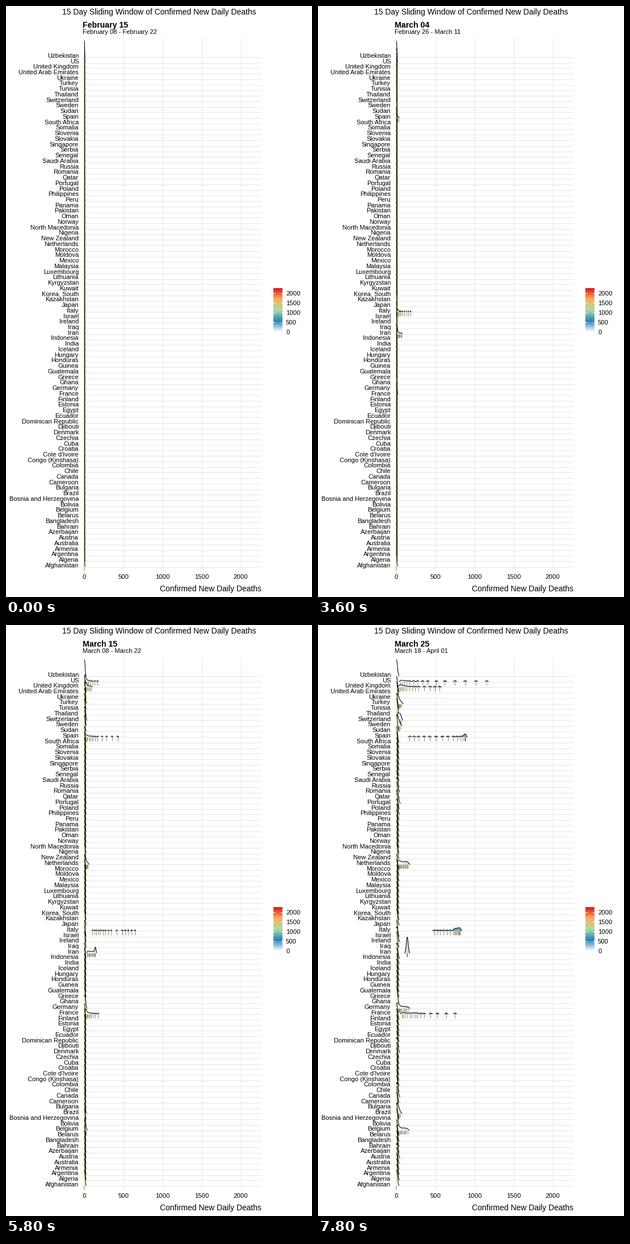
Recreate the animation shown at these times as a matplotlib script. Size 539x1039 px, loop 8000 ms.

```python
import matplotlib.pyplot as plt
import numpy as np
from matplotlib.animation import FuncAnimation
from matplotlib.collections import PathCollection
from matplotlib.colors import LinearSegmentedColormap, to_rgba
from matplotlib.path import Path

W, H, DPI = 539, 1039, 100
PX = 72 / DPI                      # points per pixel
FRAMES, STEP = 40, 200
X0, X_UNIT = 138.0, 275.6 / 2000   # pixel of value 0, pixels per death
TOP, BOTTOM = 90.0, 986.0          # baselines of the first and last row
LEFT, RIGHT = 135, 450
VMAX = 2265
PEAK = 29                          # pixel height of the tallest ridge
GRID = "#e5e5e5"

plt.rcParams["font.family"] = "Liberation Sans"

COUNTRIES = """Afghanistan|Algeria|Argentina|Armenia|Australia|Austria|Azerbaijan|Bahrain
Bangladesh|Belarus|Belgium|Bolivia|Bosnia and Herzegovina|Brazil|Bulgaria|Cameroon|Canada
Chile|Colombia|Congo (Kinshasa)|Cote d'Ivoire|Croatia|Cuba|Czechia|Denmark|Djibouti
Dominican Republic|Ecuador|Egypt|Estonia|Finland|France|Germany|Ghana|Greece|Guatemala
Guinea|Honduras|Hungary|Iceland|India|Indonesia|Iran|Iraq|Ireland|Israel|Italy|Japan
Kazakhstan|Korea, South|Kuwait|Kyrgyzstan|Lithuania|Luxembourg|Malaysia|Mexico|Moldova
Morocco|Netherlands|New Zealand|Nigeria|North Macedonia|Norway|Oman|Pakistan|Panama|Peru
Philippines|Poland|Portugal|Qatar|Romania|Russia|Saudi Arabia|Senegal|Serbia|Singapore
Slovakia|Slovenia|Somalia|South Africa|Spain|Sudan|Sweden|Switzerland|Thailand|Tunisia
Turkey|Ukraine|United Arab Emirates|United Kingdom|US|Uzbekistan""".replace("\n", "|").split("|")
COUNTRIES.reverse()                # top row first
ROWS = np.linspace(TOP, BOTTOM, len(COUNTRIES))

# Days count from March 1 as day 1. Smoothed deaths on every second day, 0 to 32.
LARGE = {
    "Italy": [10, 19, 29, 59, 103, 153, 206, 267, 341, 483, 560, 646, 729, 758, 801, 814, 763],
    "Iran": [9, 11, 15, 24, 37, 56, 76, 100, 122, 139, 141, 138, 139, 136, 138, 132, 134],
    "Spain": [.1, .5, 1.5, 4, 7, 18, 39, 71, 111, 169, 281, 425, 586, 729, 820, 882, 872],
    "France": [.2, .5, 1, 3, 5, 9, 18, 25, 42, 69, 111, 172, 225, 270, 352, 522, 750],
    "US": [.6, 2, 3, 3.5, 4, 5, 8, 15, 28, 53, 98, 167, 270, 399, 620, 878, 1154],
    "United Kingdom": [.1, .2, .3, .6, 1, 2, 5, 11, 20, 30, 56, 87, 130, 200, 283, 430, 551],
}
# Values on these days for middling counts.
MID_DAYS = [10, 14, 18, 22, 25, 28, 32]
MID = {
    "Netherlands": [1, 8, 18, 45, 75, 110, 150],
    "Germany": [.5, 2, 6, 20, 43, 85, 150],
    "Belgium": [.3, 2, 8, 25, 50, 88, 142],
    "Switzerland": [.8, 3, 7, 16, 29, 45, 58],
}
# Final values of small counts that grow exponentially.
SMALL = {
    "Turkey": 65, "Brazil": 48, "Sweden": 48, "Portugal": 27, "Canada": 20, "Austria": 19,
    "Romania": 18, "Denmark": 16, "Ireland": 16, "Indonesia": 14, "Philippines": 12,
    "Algeria": 10, "Ecuador": 10, "Poland": 8, "India": 8, "Dominican Republic": 6,
}

FIRST_DAY = -21
DAYS = np.arange(FIRST_DAY, 33)


def series(name, rng):
    """Smoothed daily deaths of one country for all days."""
    minor = rng.lognormal(0.5, 0.7)
    if name in LARGE:
        known = LARGE[name]
        v = np.interp(DAYS, np.arange(0, 33, 2), known)
        return np.where(DAYS < 0, known[0] * 2.0 ** (DAYS / 2), v)
    if name in MID:
        v = np.exp(np.interp(DAYS, MID_DAYS, np.log(MID[name])))
        return np.where(DAYS < 10, MID[name][0] * 2.0 ** ((DAYS - 10) / 3), v)
    return SMALL.get(name, minor) * 2.0 ** ((DAYS - 32) / 3.6)


rng = np.random.default_rng(15)
DEATHS = np.array([series(c, rng) for c in COUNTRIES])

CMAP = LinearSegmentedColormap.from_list(
    "deaths", ["white", "#2b83ba", "#abdda4", "#fdae61", "#d7191c"])
CLEAR = (0, 0, 0, 0)
BLACK = to_rgba("black")
YELLOW = to_rgba("#f4f03c")
GREEN = to_rgba("#74c23a")
TICK_COLORS = [to_rgba(c) for c in ("#8f8a55", "#b0906c", "#7d9c78", "#9a8560")]

fig = plt.figure(figsize=(W / DPI, H / DPI), dpi=DPI, facecolor="white")
ax = fig.add_axes([0, 0, 1, 1])
ax.set_xlim(0, W)
ax.set_ylim(H, 0)
ax.axis("off")


def label(x, y, text, size, ha="left", **kw):
    return ax.text(x, y, text, fontsize=size * PX, ha=ha, va="baseline", color="black", **kw)


def draw_static():
    ax.hlines(ROWS, LEFT, RIGHT, color=GRID, lw=PX, zorder=1)
    for v in range(0, 2001, 500):
        x = X0 + v * X_UNIT
        ax.vlines(x, 56, 992, color=GRID, lw=PX, zorder=1)
        label(x, 1007, str(v), 11.3, "center")
    for y, name in zip(ROWS, COUNTRIES):
        label(128, y + 0.8, name, 11.1, "right")
    label(269.5, 15, "15 Day Sliding Window of Confirmed New Daily Deaths", 13.85, "center")
    label(RIGHT, 1029, "Confirmed New Daily Deaths", 13.85, "right")

    top, bottom = 496, 573
    ramp = np.linspace(1, 0, 256)[:, None]
    ax.imshow(ramp, cmap=CMAP, extent=(471, 487, bottom, top), aspect="auto", zorder=2)
    for v in range(0, 2001, 500):
        y = bottom - v / VMAX * (bottom - top)
        ax.hlines([y, y], [471, 484], [474, 487], color="white", lw=PX, zorder=3)
        label(493, y + 4.2, str(v), 11.3)
    ax.set_xlim(0, W)
    ax.set_ylim(H, 0)


draw_static()
date_text = label(135, 38, "", 14.1, weight="bold")
range_text = label(135, 48.6, "", 11.15)
ridges = PathCollection([], zorder=4)
ax.add_collection(ridges, autolim=False)

XS = np.arange(X0, RIGHT, 0.25)


def date_name(day):
    if day <= 0:
        return f"February {29 + day:02d}"
    return f"March {day:02d}" if day <= 31 else f"April {day - 31:02d}"


def runs(mask):
    """Start and end of each stretch of true values."""
    edges = np.flatnonzero(np.diff(np.r_[0, mask.astype(int), 0]))
    return zip(edges[::2], edges[1::2])


def row_shapes(y, values, width, first_day, last_row):
    """Fill, outline and day ticks of one country, as (points, face, edge)."""
    px = X0 + values * X_UNIT
    xs = XS[XS < px.max() + 4 * width + 1]
    density = np.exp(-0.5 * ((xs[:, None] - px) / width) ** 2).mean(axis=1)
    curve = y - PEAK * density
    for a, b in runs(density > 0.01):
        for i in range(a, b - 1, 4):
            j = min(i + 5, b - 1)
            pts = [(xs[i], y), *zip(xs[i:j + 1], curve[i:j + 1]), (xs[j], y)]
            yield pts, CMAP((xs[i] - X0) / X_UNIT / VMAX), CLEAR
        if b - a > 1:
            yield list(zip(xs[a:b] + 0.3, curve[a:b])), CLEAR, BLACK
    if px.min() < X0 + 1:
        yield [(137.3, y - 1), (137.3, y + 7)], CLEAR, GREEN if last_row else YELLOW
    for k in np.flatnonzero(px >= X0 + 2.2):
        color = TICK_COLORS[(first_day + k) % len(TICK_COLORS)]
        yield [(px[k], y), (px[k], y + 6.5)], CLEAR, color


def update(i):
    day = i - 14
    date_text.set_text(date_name(day))
    range_text.set_text(f"{date_name(day - 7)} - {date_name(day + 7)}")
    width = 0.25 + 1.35 * (i / (FRAMES - 1)) ** 2
    paths, faces, edges = [], [], []
    for r, y in enumerate(ROWS):
        for pts, face, edge in row_shapes(y, DEATHS[r, i:i + 15], width, i, r == len(ROWS) - 1):
            paths.append(Path(pts))
            faces.append(face)
            edges.append(edge)
    ridges.set_paths(paths)
    ridges.set_facecolor(faces)
    ridges.set_edgecolor(edges)
    ridges.set_linewidth([0 if e == CLEAR else 1.05 * PX for e in edges])
    return ridges, date_text, range_text


anim = FuncAnimation(fig, update, frames=FRAMES, interval=STEP, repeat=True, repeat_delay=0)
plt.show()
```
